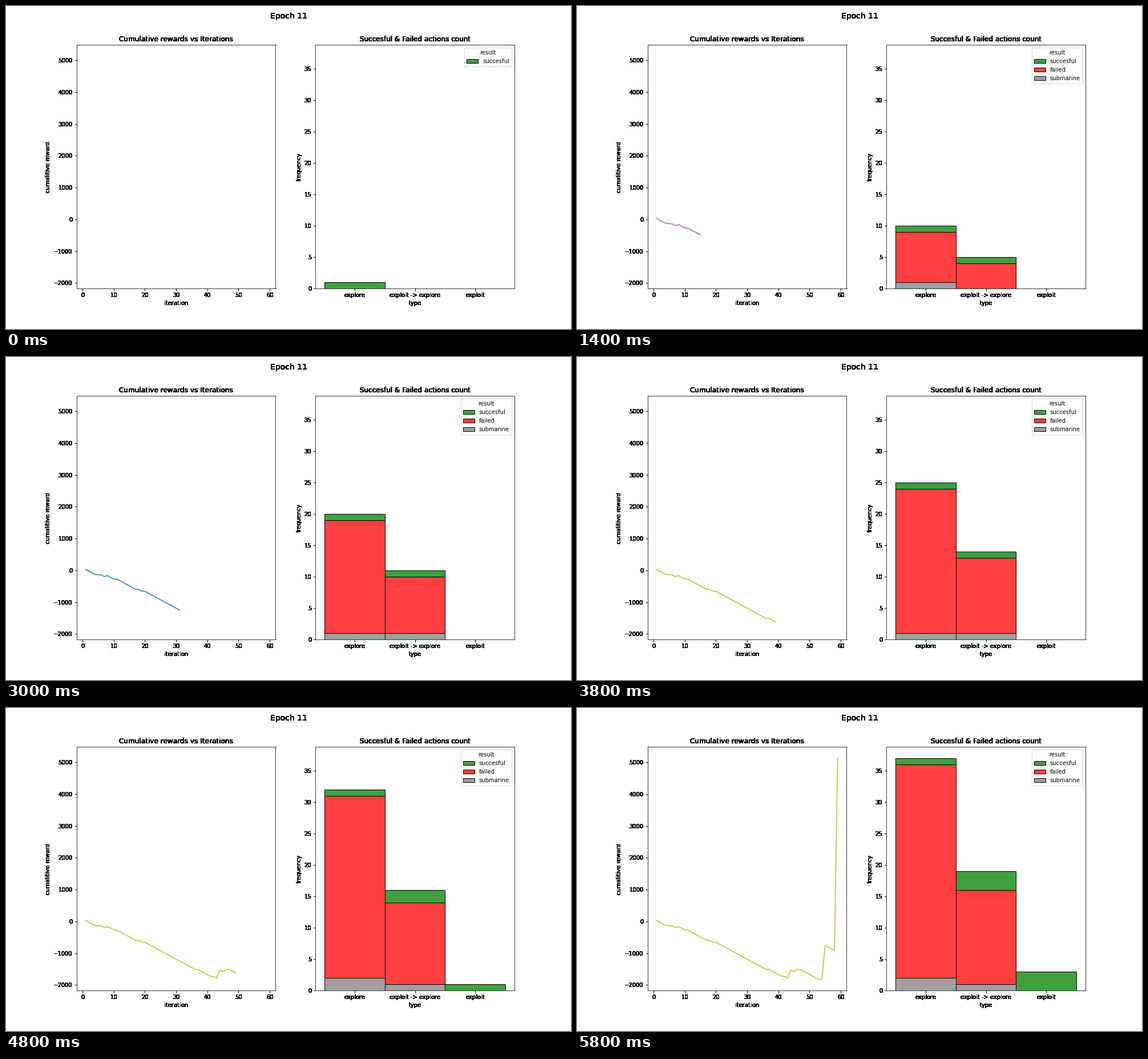
A matplotlib script that plays this animation: 990x566 px, repeating every 5.9 s.

```python
import numpy as np
import matplotlib.pyplot as plt
from matplotlib.animation import FuncAnimation
from matplotlib.patches import Rectangle

W, H, DPI = 990, 566, 72
STEPS = 59
KINDS = ["explore", "exploit -> explore", "exploit"]
COLORS = {"succesful": "green", "failed": "red", "submarine": "gray"}

GAINS = {1: 29, 8: 33, 44: 252, 46: 80, 54: 25, 55: 1050, 59: 6052}
SUBMARINES = {11, 20, 42}
MILD = SUBMARINES | {5, 6, 18, 37, 47}
EXPLOITS = {46, 55, 59}
EXPLORES = {3, 40, 43, 48, 58}


def kind_of(n):
    if n in EXPLOITS:
        return 2
    detour = n % 5 in (0, 3) or n in (44, 54)
    return int(detour and n not in EXPLORES)


def result_of(n):
    return 0 if n in GAINS else 2 if n in SUBMARINES else 1


def reward_of(n):
    return GAINS.get(n, -6 if n in MILD else -53)


steps = np.arange(1, STEPS + 1)
rewards = np.cumsum([reward_of(n) for n in steps])
counts = np.zeros((STEPS, 3, 3), int)
for n in steps:
    counts[n - 1:, result_of(n), kind_of(n)] += 1


def heavy(img, dpi):
    """Darken antialiased edges as if drawn many times over."""
    out = np.zeros_like(img)
    out[..., 3] = 1 - (1 - img[..., 3]) ** 40
    return out, 0, 0


def style(ax, title, xlabel, ylabel):
    ax.set_title(title, fontsize=12)
    ax.set_xlabel(xlabel)
    ax.set_ylabel(ylabel)
    for part in (ax.title, ax.xaxis, ax.yaxis):
        part.set_agg_filter(heavy)


def fit(values, margin=0.05):
    low, high = min(values), max(values)
    pad = margin * (high - low)
    return low - pad, high + pad


def box(color, x=0):
    return Rectangle((x - 0.5, 0), 1, 0, fc=(color, 0.75), ec="black", lw=1)


plt.rcParams.update({"font.family": "DejaVu Sans", "font.size": 10})
fig, (left, right) = plt.subplots(1, 2, figsize=(W / DPI, H / DPI), dpi=DPI)
fig.subplots_adjust(left=0.125, right=0.9, bottom=0.125, top=0.88, wspace=0.2)
fig.suptitle("Epoch 11", fontsize=14).set_agg_filter(heavy)

style(left, "Cumulative rewards vs Iterations", "iteration", "cumalitive reward")
left.set_xlim(fit(steps))
left.set_ylim(fit(rewards))
line, = left.plot([], [], lw=1.5)

style(right, "Succesful & Failed actions count", "type", "frequency")
right.set_xlim(fit([-0.5, 2.5]))
right.set_ylim(0, counts[-1].sum(axis=0).max() * 1.05)
right.set_xticks(range(3), KINDS)
bars = [[right.add_patch(box(color, x)) for x in range(3)]
        for color in COLORS.values()]


def update(i):
    line.set_data(steps[:i + 1], rewards[:i + 1])
    line.set_color(f"C{i % 10}")

    base = np.zeros(3)
    for row, heights in zip(bars[::-1], counts[i][::-1]):
        for bar, y, height in zip(row, base, heights):
            bar.set_y(y)
            bar.set_height(height)
            bar.set_visible(height > 0)
        base += heights

    seen = [name for name, row in zip(COLORS, counts[i]) if row.any()]
    right.legend([box(COLORS[name]) for name in seen], seen,
                 title="result", loc="upper right")
    return []


anim = FuncAnimation(fig, update, frames=STEPS, interval=100,
                     repeat=True, repeat_delay=0, blit=False)
plt.show()
```
